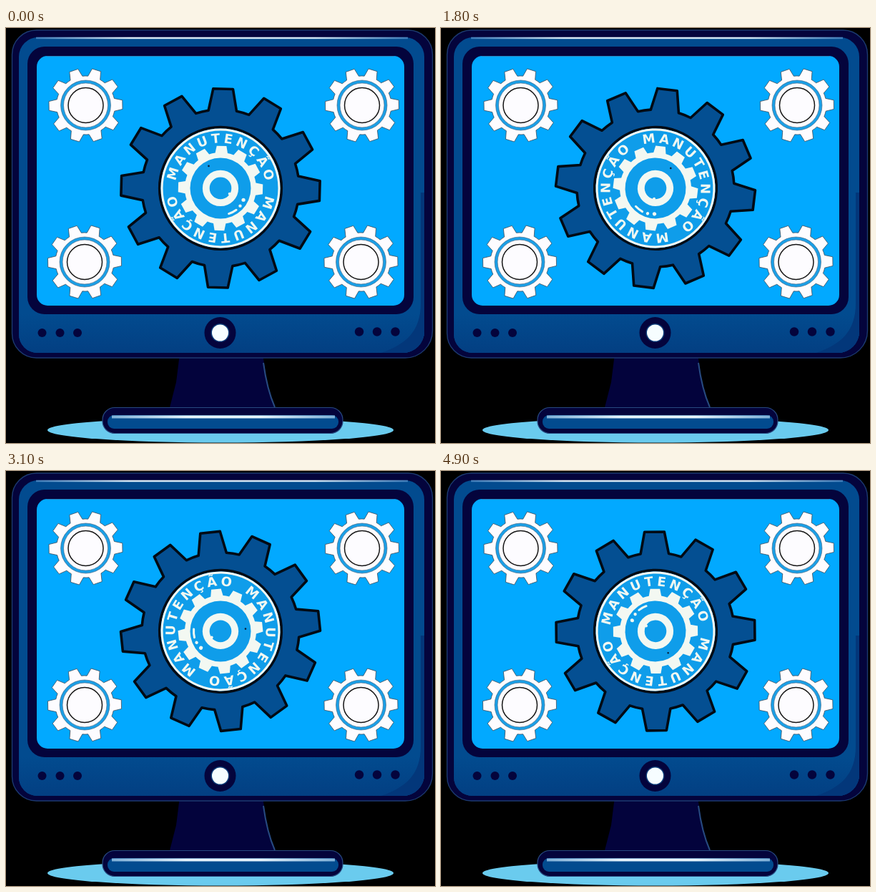
Write an HTML page with a canvas that moves like this. It is 600 px wide and 580 px high and loops after 5000 ms.

```html
<!DOCTYPE html>
<html lang="pt">
<head>
<meta charset="utf-8">
<title>Manutenção</title>
<style>
html, body { margin: 0; width: 100%; height: 100%; overflow: hidden; background: #000; }
canvas { display: block; }
</style>
</head>
<body>
<canvas id="stage" width="600" height="580"></canvas>
<script>
const ctx = document.getElementById('stage').getContext('2d');
const TAU = Math.PI * 2;
const rad = d => d * Math.PI / 180;
const NAVY = '#04043c', BODY = '#024b8f', SKY = '#02a9ff', DISC = '#0f9dea', IVORY = '#f3f8f2';
const LOOP = 5000, STEP = 100, TURN = 3.63;

function paint(fill, stroke, width) {
  if (fill) { ctx.fillStyle = fill; ctx.fill(); }
  if (stroke) { ctx.strokeStyle = stroke; ctx.lineWidth = width; ctx.stroke(); }
}

function box(x, y, w, h, r, fill, stroke, width) {
  ctx.beginPath();
  ctx.roundRect(x, y, w, h, r);
  paint(fill, stroke, width);
}

function circle(x, y, r, fill, stroke, width) {
  ctx.beginPath();
  ctx.arc(x, y, r, 0, TAU);
  paint(fill, stroke, width);
}

function poly(points, fill) {
  ctx.beginPath();
  points.forEach(([x, y]) => ctx.lineTo(x, y));
  ctx.closePath();
  paint(fill);
}

function line(x1, y1, x2, y2, color, width) {
  ctx.beginPath();
  ctx.moveTo(x1, y1);
  ctx.lineTo(x2, y2);
  paint(null, color, width);
}

function fade(x1, y1, x2, y2, ...colors) {
  const g = ctx.createLinearGradient(x1, y1, x2, y2);
  colors.forEach((c, i) => g.addColorStop(i / (colors.length - 1), c));
  return g;
}

// Half widths of a tooth at its root and top are in degrees.
function gear(teeth, root, top, halfRoot, halfTop, phase, fill, stroke, width) {
  const at = (r, a) => ctx.lineTo(r * Math.cos(rad(a)), r * Math.sin(rad(a)));
  ctx.beginPath();
  for (let i = 0; i < teeth; i++) {
    const a = phase - 90 + i * 360 / teeth;
    at(root, a - halfRoot);
    at(top, a - halfTop);
    at(top, a + halfTop);
    ctx.arc(0, 0, root, rad(a + halfRoot), rad(a + 360 / teeth - halfRoot));
  }
  ctx.closePath();
  ctx.lineJoin = 'round';
  paint(fill, stroke, width);
}

function stand() {
  ctx.beginPath();
  ctx.ellipse(300, 562, 242, 17.5, 0, 0, TAU);
  paint('#6acbee');
  poly([[243, 455], [359, 455], [364, 490], [376, 534], [228, 534], [238, 495]], '#03033c');
  ctx.beginPath();
  ctx.moveTo(360, 468);
  ctx.quadraticCurveTo(365, 505, 376, 530);
  paint(null, '#274a80', 2);
  box(135, 530.5, 336, 36, 17, NAVY, '#27497f', 1.2);
  box(142, 541, 323, 19, 9, BODY);
  line(148, 543.5, 460, 543.5, fade(148, 0, 460, 0, '#7fb0d8', '#e6f3fc', '#e6f3fc', '#7fb0d8'), 4);
}

function monitor() {
  box(8.5, 3, 588, 458, [34, 34, 38, 34], NAVY, '#1c3a70', 1.4);
  box(18, 13, 567, 441, [27, 27, 30, 26], BODY);

  // shaded right side and lower corner
  ctx.save();
  ctx.beginPath();
  ctx.roundRect(18, 13, 567, 441, [27, 27, 30, 26]);
  ctx.clip();
  ctx.fillStyle = fade(0, 400, 0, 455, '#024b8f', '#033f82');
  ctx.fillRect(18, 400, 567, 54);
  ctx.beginPath();
  ctx.moveTo(580, 230);
  ctx.lineTo(590, 230);
  ctx.lineTo(590, 460);
  ctx.lineTo(505, 460);
  ctx.bezierCurveTo(550, 448, 580, 432, 580, 385);
  paint('#03377a');
  ctx.restore();

  line(42, 14, 562, 14, fade(42, 0, 562, 0, '#3f7cb8', '#d8e8f4', '#d8e8f4', '#d0e4f2', '#3f7cb8'), 2.5);
  box(30, 26, 540, 374, 24, NAVY);
  box(43, 39, 514, 349, 15, SKY);
  line(57, 39.5, 543, 39.5, '#2b83bd', 1);

  for (const x of [50.5, 75.5, 100]) circle(x, 426, 6, NAVY);
  for (const x of [494, 519, 544.5]) circle(x, 424.5, 6.2, NAVY);
  circle(299.5, 426, 22, NAVY);
  circle(299.5, 426, 13, '#0d3c78');
  circle(299.5, 426, 11.5, '#f6fdff');
}

function smallGear(x, y) {
  ctx.save();
  ctx.translate(x, y);
  gear(10, 41, 51.8, 12.5, 7, 17, '#fdfcff', '#3c4a58', 0.8);
  circle(0, 0, 33, null, '#1b9fe6', 4);
  circle(0, 0, 35, null, '#40607c', 0.6);
  circle(0, 0, 31, null, '#40607c', 0.6);
  circle(0, 0, 24.5, '#fdfcff', '#151515', 1.5);
  ctx.restore();
}

// Sets a word along the top of a circle, centred on the vertical.
function arcText(word, baseline, span) {
  const widths = [...word].map(c => ctx.measureText(c).width);
  const total = widths.reduce((a, b) => a + b);
  const gap = (rad(span) * baseline - total) / word.length;
  let pos = -rad(span) * baseline / 2;
  [...word].forEach((c, i) => {
    const adv = widths[i] + gap;
    ctx.save();
    ctx.rotate((pos + adv / 2) / baseline);
    ctx.fillText(c, 0, -baseline);
    ctx.restore();
    pos += adv;
  });
}

function wheel(angle) {
  ctx.save();
  ctx.translate(300, 223.9);
  ctx.rotate(rad(angle));

  gear(12, 110, 139.5, 10.3, 5.7, 1.5, '#044f92', '#020a14', 3.6);
  circle(0, 0, 85.3, DISC, '#020a14', 3.6);
  circle(0, 0, 82, null, IVORY, 3);

  ctx.font = 'bold 18px "DejaVu Sans", sans-serif';
  ctx.textAlign = 'center';
  ctx.fillStyle = IVORY;
  for (let i = 0; i < 2; i++) {
    arcText('MANUTENÇÃO', 63.5, 166);
    ctx.rotate(Math.PI);
  }

  gear(12, 50, 59.5, 10, 6.6, 1.5, IVORY);
  circle(0, 0, 42.5, DISC);
  circle(0, 0, 20.2, null, IVORY, 9.8);

  // glints
  ctx.lineCap = 'round';
  ctx.beginPath();
  ctx.arc(0, 0, 37.5, rad(54), rad(72));
  paint(null, IVORY, 3);
  for (const [r, a, size] of [[37, 42, 2.2], [36, 27, 2.6], [15, 32, 2]])
    circle(r * Math.cos(rad(a)), r * Math.sin(rad(a)), size, IVORY);
  circle(-16.5, -31, 1.3, '#0a2038');
  ctx.lineCap = 'butt';
  ctx.restore();
}

function draw(now) {
  const step = Math.floor(now % LOOP / STEP);
  ctx.fillStyle = '#000';
  ctx.fillRect(0, 0, 600, 580);
  stand();
  monitor();
  smallGear(111.5, 108);
  smallGear(498, 108);
  smallGear(110, 327);
  smallGear(496.5, 327);
  wheel(step * TURN);
}

const start = performance.now();
function tick() {
  draw(performance.now() - start);
  requestAnimationFrame(tick);
}
tick();
</script>
</body>
</html>
```
